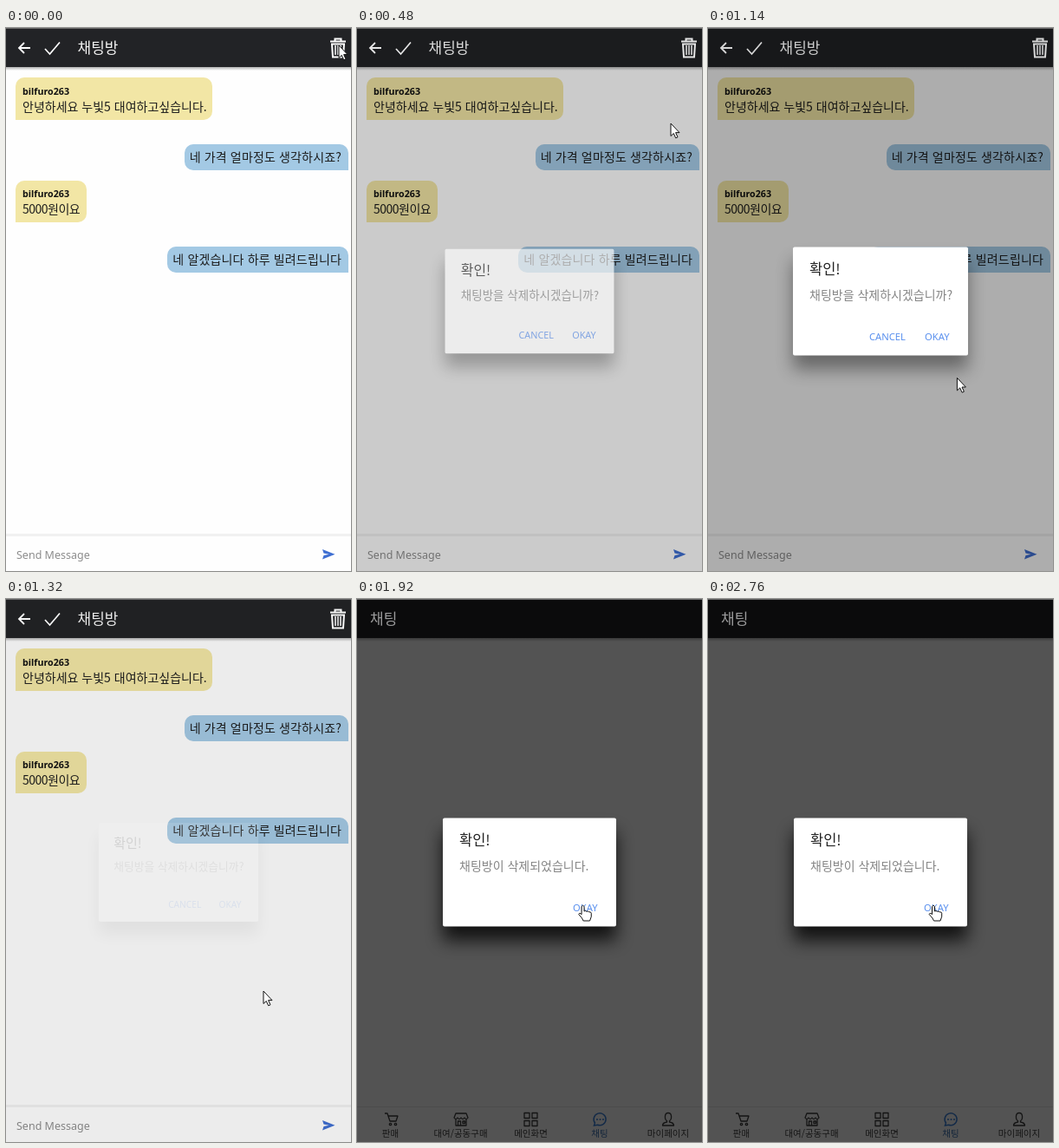
An HTML page that plays this animation: 398x626 px, repeating every 2.88 s.

```html
<!DOCTYPE html>
<html lang="ko">
<head>
<meta charset="utf-8">
<title>채팅방</title>
<style>
  html, body { margin: 0; width: 100%; height: 100%; overflow: hidden; background: #fefefe; }
  svg { display: block; width: 398px; height: 626px; }
  text { font-family: "Noto Sans CJK KR", "Noto Sans CJK", sans-serif; font-size: 14px; fill: #1c1c1c; }
  .latin { font-family: "Noto Sans", "Open Sans", sans-serif; }
  .user { font-size: 10.7px; font-weight: 700; fill: #111; }
  .me { text-anchor: end; letter-spacing: .15px; }
  .bar { font-size: 17px; font-weight: 500; fill: #f4f4f4; }
  .title { font-size: 16.5px; fill: #222; }
  .body { fill: #858585; }
  .btn { font-size: 11.2px; fill: #5a90ee; }
  .tab { font-size: 10.5px; text-anchor: middle; fill: #3c3c3c; }
  .line { fill: none; stroke: #3c3c3c; stroke-width: 1.3; stroke-linejoin: round; }
</style>
</head>
<body>
<svg viewBox="0 0 398 626">
  <defs>
    <filter id="blur" x="-40%" y="-60%" width="180%" height="220%"><feGaussianBlur stdDeviation="10"/></filter>
    <linearGradient id="fall" x1="0" y1="0" x2="0" y2="1">
      <stop offset="0" stop-color="#000" stop-opacity=".3"/>
      <stop offset="1" stop-color="#000" stop-opacity="0"/>
    </linearGradient>
  </defs>

  <rect width="398" height="626" fill="#fefefe"/>

  <g id="list">
    <rect y="585" width="398" height="1" fill="#e6e6e6"/>
    <g class="line">
      <path d="M32 593h3l3 9h7l2-6H36"/><circle cx="38.5" cy="605.5" r="1.2"/><circle cx="44.5" cy="605.5" r="1.2"/>
      <path d="M114 593h12l2 5q-2 3-4 0q-2 3-4 0q-2 3-4 0q-2 3-4 0zM114 600v7h12v-7M116.500 607v-5h3v5M122 602h2.500v2.500h-2.500z"/>
      <path d="M193 592.500h6v6h-6zM202 592.500h6v6h-6zM193 601.500h6v6h-6zM202 601.500h6v6h-6z"/>
      <path d="M359 592.500c-5 0-4 8-1.500 9v1.500c-3 .5-5 1.500-5 4h13c0-2.500-2-3.500-5-4v-1.500c2.500-1 3.500-9-1.500-9z"/>
    </g>
    <path d="M273.500 607l1-3a7 7 0 1 1 3 2.300z" fill="none" stroke="#3a7fd8" stroke-width="1.5"/>
    <g fill="#3a7fd8"><circle cx="277" cy="600" r="1"/><circle cx="280.500" cy="600" r="1"/><circle cx="284" cy="600" r="1"/></g>
    <text class="tab" x="38.500" y="620">판매</text>
    <text class="tab" x="119.500" y="620">대여/공동구매</text>
    <text class="tab" x="200.500" y="620">메인화면</text>
    <text class="tab" x="280" y="620" style="fill:#3a6fb0">채팅</text>
    <text class="tab" x="359" y="620">마이페이지</text>
  </g>

  <g id="room">
    <rect y="45" width="398" height="581" fill="#fefefe"/>
    <g fill="#f2e6a5">
      <path d="M11 106V67a10 10 0 0 1 10-10H228a10 10 0 0 1 10 10V96a10 10 0 0 1-10 10z"/>
      <path d="M11 224V186a10 10 0 0 1 10-10H83a10 10 0 0 1 10 10V214a10 10 0 0 1-10 10z"/>
    </g>
    <g fill="#a3c9e4">
      <path d="M395 164H216a10 10 0 0 1-10-10V144a10 10 0 0 1 10-10H385a10 10 0 0 1 10 10z"/>
      <path d="M395 282H196a10 10 0 0 1-10-10V262a10 10 0 0 1 10-10H385a10 10 0 0 1 10 10z"/>
    </g>
    <text class="latin user" x="19" y="77">bilfuro263</text>
    <text x="19" y="96">안녕하세요 누빛5 대여하고싶습니다.</text>
    <text class="me" x="387" y="154">네 가격 얼마정도 생각하시죠?</text>
    <text class="latin user" x="19" y="195">bilfuro263</text>
    <text x="19" y="214" letter-spacing="-.5">5000원이요</text>
    <text class="me" x="387" y="272">네 알겠습니다 하루 빌려드립니다</text>
    <rect y="583" width="398" height="3" fill="#f1f1f1"/>
    <text class="latin" x="12" y="612" style="font-size:12.5px;fill:#8c8c8c">Send Message</text>
    <path d="M365 601l14.500 5.800L365 612.500l1.500-4.500 6-1.200-6-1.200z" fill="#3f6fd2"/>
  </g>

  <rect width="398" height="45" fill="#222326"/>
  <rect y="45" width="398" height="4" fill="url(#fall)"/>

  <rect id="shade" width="398" height="626" fill="#000"/>

  <g id="roomBar">
    <path d="M28 23H15.500M21 17l-6 6 6 6" fill="none" stroke="#fff" stroke-width="1.8"/>
    <path d="M45 24l5.500 6L62 16.500" fill="none" stroke="#fff" stroke-width="1.7"/>
    <text class="bar" x="82.500" y="29">채팅방</text>
    <path d="M374 15.500H392M379.500 15v-2.500h7V15" fill="none" stroke="#fff" stroke-width="2"/>
    <path d="M376 18.500l1 15h12l1-15z" fill="none" stroke="#fff" stroke-width="2"/>
    <path d="M380 20v11M383 20v11M386 20v11" stroke="#fff" stroke-width="1.500"/>
  </g>
  <text id="listBar" class="bar" x="15" y="29">채팅</text>
  <rect width="398" height="1" fill="#686868"/>

  <g id="ask">
    <rect x="98" y="268.500" width="202" height="125" filter="url(#blur)" opacity=".4"/>
    <rect x="98" y="252.500" width="202" height="125" rx="2" fill="#fff"/>
    <text class="title" x="117" y="284">확인!</text>
    <text class="body" x="117" y="313">채팅방을 삭제하시겠습니까?</text>
    <text class="latin btn" x="186" y="360">CANCEL</text>
    <text class="latin btn" x="250" y="360">OKAY</text>
  </g>

  <g id="done">
    <rect id="doneShadow" x="99" y="268.500" width="200" height="125" filter="url(#blur)"/>
    <rect x="99" y="252.500" width="200" height="125" rx="2" fill="#fff"/>
    <text class="title" x="118" y="284">확인!</text>
    <text class="body" x="118" y="313">채팅방이 삭제되었습니다.</text>
    <text class="latin btn" x="249" y="360">OKAY</text>
  </g>

  <g id="cursor" fill="#fff" stroke="#111" stroke-width="1" stroke-linejoin="round">
    <path id="arrow" d="M0 0v14.500l3.300-3 2.400 5.300 2.300-1-2.400-5.200H10z"/>
    <path id="hand" d="M-1.500 1.500q1.500-2.500 3 0V7q1.500-1.200 3 .3 1.700-.9 2.800.6 2-.5 2.400 1.300v4L8 18H.5l-1.500-3-3.800-4.500q.5-2 2.200-.8l1.100 1z"/>
  </g>
</svg>
<script>
const LOOP = 2880;
const STEPS = [0, 300, 420, 480, 600, 720, 840, 960, 1020, 1140, 1260, 1320,
  1440, 1500, 1620, 1740, 1860, 1920, 2040, 2160, 2280, 2340, 2760];

// Keys are [time, value...]
const DIM = [[300, 0], [420, .08], [480, .2], [600, .31], [720, .32], [1140, .32],
  [1260, .16], [1320, .07], [1440, .79], [1740, .79], [1920, .67]];
const ASK = [[300, 0], [420, .22], [480, .65], [600, .97], [720, 1], [1140, 1],
  [1260, .45], [1320, .12], [1440, 0]];
const PAGE = [[1500, 0], [1740, 1]];
const POINTER = [[300, 384, 20], [420, 380, 46], [480, 362, 110], [600, 308, 265],
  [720, 267, 352], [840, 265, 353], [1020, 281, 371], [1320, 297, 452],
  [1440, 285, 408], [1620, 262, 353], [2040, 260, 353]];

const el = {};
for (const node of document.querySelectorAll("[id]")) el[node.id] = node;

function track(keys, t, i = 1) {
  if (t <= keys[0][0]) return keys[0][i];
  for (let k = 1; k < keys.length; k++) {
    const a = keys[k - 1], b = keys[k];
    if (t <= b[0]) return a[i] + (b[i] - a[i]) * (t - a[0]) / (b[0] - a[0]);
  }
  return keys[keys.length - 1][i];
}

const fade = (node, value) => node.setAttribute("opacity", value.toFixed(3));
const show = (node, on) => node.setAttribute("display", on ? "inline" : "none");
const move = (node, value) => node.setAttribute("transform", value);

function draw(time) {
  const t = STEPS.filter(s => s <= time).pop();
  const dim = track(DIM, t), ask = track(ASK, t), page = track(PAGE, t);
  const glyphs = 1 - .57 * dim;

  fade(el.shade, dim);
  fade(el.room, 1 - page);
  move(el.room, `translate(0 ${40 * page * page})`);
  fade(el.list, page);
  fade(el.roomBar, glyphs * (1 - page));
  fade(el.listBar, glyphs * page);

  fade(el.ask, ask);
  move(el.ask, `translate(199 315) scale(${.9 + .1 * ask}) translate(-199 -315)`);
  show(el.done, t >= 1440);
  fade(el.doneShadow, t < 1860 ? .87 : .78);

  const arrow = t < 300 || (t >= 480 && t < 720) || (t >= 1020 && t < 1440);
  show(el.cursor, t < 2040 || t >= 2760);
  show(el.arrow, arrow);
  show(el.hand, !arrow);
  move(el.cursor, `translate(${track(POINTER, t)} ${track(POINTER, t, 2)})`);
}

const start = performance.now();
function tick() {
  draw((performance.now() - start) % LOOP);
  requestAnimationFrame(tick);
}
tick();
</script>
</body>
</html>
```
